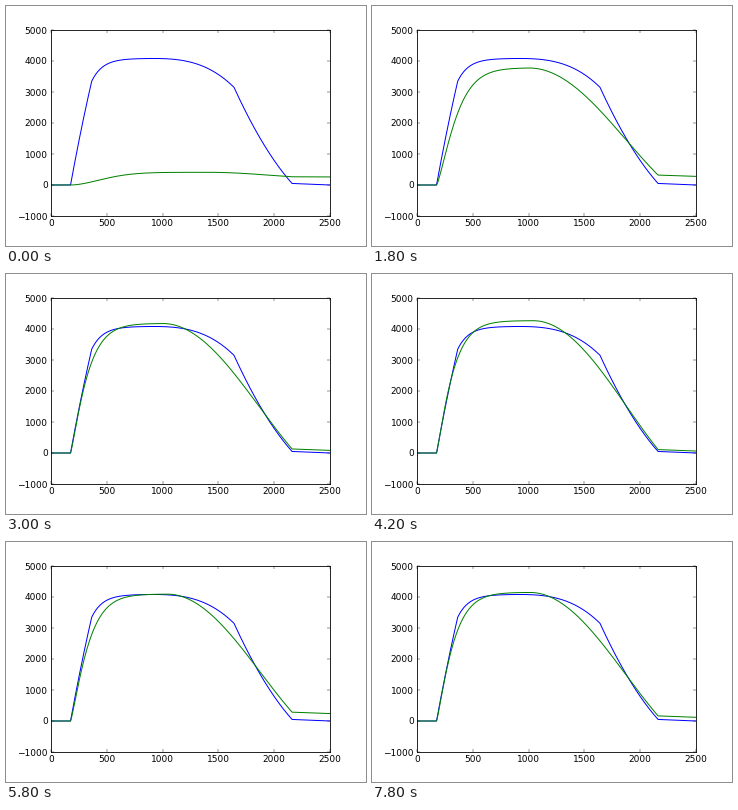
A matplotlib script for the animation above (8000 ms loop, 360 by 240 pixels).

```python
import numpy as np
import matplotlib.pyplot as plt
from matplotlib.animation import FuncAnimation

FRAMES, INTERVAL = 40, 200
START, STOP, END = 175, 2160, 2500
SHOULDER, DROP = 365, 1640

plt.rcParams.update({
    "font.family": "DejaVu Sans", "font.size": 10.8,
    "axes.linewidth": 1.0, "lines.linewidth": 1.2,
    "xtick.direction": "in", "ytick.direction": "in",
    "xtick.top": True, "ytick.right": True,
    "xtick.major.size": 4, "ytick.major.size": 4,
    "xtick.major.width": 0.5, "ytick.major.width": 0.5,
    "xtick.major.pad": 4, "ytick.major.pad": 4,
})

t = np.arange(0, END + 1, 5.0)


def bowed(x0, y0, x1, y1, bow=0):
    """Parabolic arc between two points; bow is its height over the chord."""
    u = (t - x0) / (x1 - x0)
    return y0 + (y1 - y0) * u + 4 * bow * u * (1 - u)


def measured():
    top = (4085 - 735 * np.exp(-np.maximum(t - SHOULDER, 0) / 100)
           - 935 * (np.maximum(t - 850, 0) / (DROP - 850)) ** 3)
    return np.select(
        [t < START, t < SHOULDER, t < DROP, t < STOP],
        [0 * t, bowed(START, 0, SHOULDER, 3350, 100), top,
         bowed(DROP, 3150, STOP, 50, -250)],
        bowed(STOP, 50, END, 0))


def model(peak, tau, turn, rest):
    """Saturating rise, cosine fall from `turn`, then a slow leak."""
    s = np.maximum(t - START, 0) / tau
    rise = peak * (1 - np.exp(-s ** (0.75 + tau / 360)))
    u = np.maximum(t - turn, 0) / (STOP - turn)
    fall = (peak - rest) * (1 - np.cos(2.1 * u)) / (1 - np.cos(2.1))
    leak = bowed(STOP, rest, END, rest - 0.011 * peak)
    return np.where(t < STOP, rise - fall, leak)


# Stages of the fit: peak, tau, turn, rest
STAGES = np.array([
    [410, 380, 1400, 265],
    [3780, 197, 1000, 320],
    [4180, 162, 1000, 130],
    [4270, 155, 1040, 110],
    [4095, 170, 1040, 285],
    [4165, 162, 1050, 275],
    [4150, 160, 1010, 165],
])
REACHED = [9, 15, 21, 29, 35, 39]


def response(frame):
    if frame < REACHED[0]:
        pos = (frame / REACHED[0]) ** 2.2
    else:
        pos = np.interp(frame, REACHED, range(1, len(STAGES)))
    params = [np.interp(pos, range(len(STAGES)), col) for col in STAGES.T]
    trial = 1.24 if frame % 15 == 8 else 1  # periodic overshooting trial
    return trial * model(*params)


fig = plt.figure(figsize=(6, 4), dpi=60, facecolor="white")
ax = fig.add_axes([0.125, 0.125, 0.775, 0.775])
ax.set_xlim(0, END)
ax.set_ylim(-1000, 5000)
ax.set_xticks(range(0, 2501, 500))
ax.set_yticks(range(-1000, 5001, 1000))
ax.plot(t, measured(), color="b")
fit, = ax.plot(t, response(0), color="g")


def update(frame):
    fit.set_ydata(response(frame))
    return fit,


anim = FuncAnimation(fig, update, frames=FRAMES, interval=INTERVAL,
                     repeat=True, repeat_delay=0)
plt.show()
```
